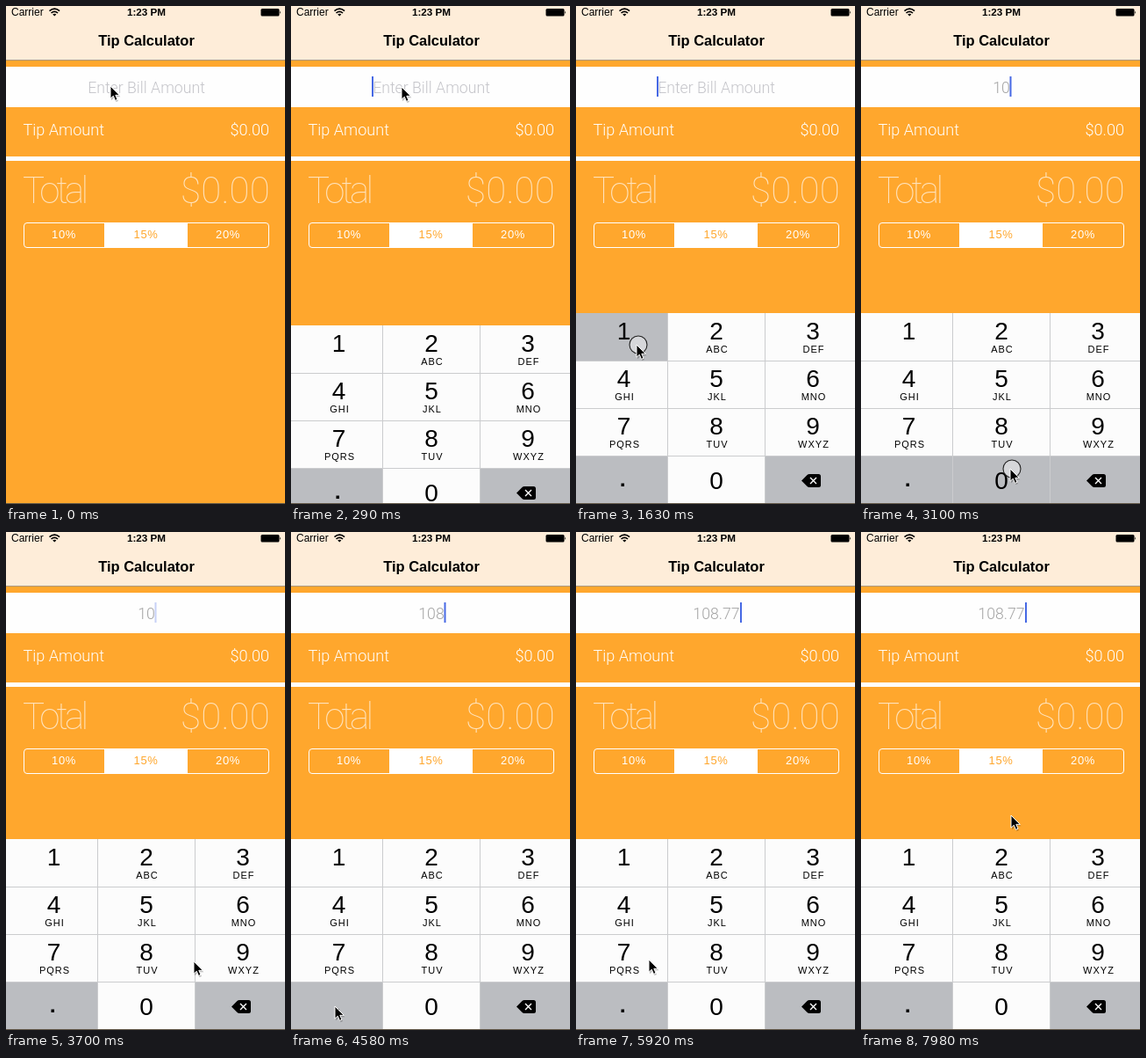
An HTML page that plays this animation: 318 px wide and 566 px high, repeating every 8000 ms.

```html
<!DOCTYPE html>
<html lang="en">
<head>
<meta charset="utf-8">
<title>Tip Calculator</title>
<style>
  html, body { margin: 0; width: 318px; height: 566px; overflow: hidden; background: #ffa72d; }
  svg { display: block; }
  text { font-family: "Liberation Sans", Arial, sans-serif; }
  .light { font: 300 17.7px Roboto, "Open Sans", sans-serif; }
  .label { font-size: 18.1px; }
  .thin { font: 100 42px Roboto, Lato, sans-serif; opacity: .68; }
  .bold { font-weight: 700; }
  .mid { text-anchor: middle; }
  .end { text-anchor: end; }
  .digit { font-size: 28px; text-anchor: middle; }
  .letters { font-size: 11px; letter-spacing: 1px; text-anchor: middle; }
  .segment { font-size: 13px; letter-spacing: .6px; text-anchor: middle; }
</style>
</head>
<body>
<svg width="318" height="566" viewBox="0 0 318 566">
  <rect width="318" height="566" fill="#ffa72d"/>
  <rect width="318" height="61" fill="#feedd9"/>
  <rect y="61" width="318" height="1" fill="#aa9880"/>
  <rect y="69" width="318" height="46" fill="#fefefe"/>
  <rect y="171" width="318" height="5" fill="#fefefe"/>

  <text x="6" y="11" font-size="12">Carrier</text>
  <g fill="none" stroke="#000" stroke-width="1.6">
    <path d="M49.5 5.6Q55.3 .8 61.1 5.6M51.5 8Q55.3 4.7 59.1 8"/>
    <path d="M53.2 9.5Q55.3 7.8 57.4 9.5L55.3 11.6Z" fill="#000" stroke="none"/>
  </g>
  <text class="bold mid" x="160" y="11" font-size="11.7">1:23 PM</text>
  <rect x="290.5" y="3" width="21" height="8.5" rx="1.5"/>
  <path d="M312.3 5.5q1.8 1.7 0 3.4z"/>
  <text class="bold mid" x="160" y="45" font-size="16.5">Tip Calculator</text>

  <text id="amount" class="light mid" x="160" y="99"></text>
  <rect id="caret" y="80" width="2" height="23" fill="#4668e4"/>

  <g fill="#fff">
    <text class="light label" x="19.5" y="147">Tip Amount</text>
    <text class="light label end" x="300" y="147">$0.00</text>
    <text class="thin" x="19" y="224" letter-spacing="-3.8">Total</text>
    <text class="thin end" x="301" y="224" letter-spacing=".2">$0.00</text>
    <rect x="20.5" y="246.5" width="279" height="28" rx="3.5" fill="none" stroke="#fff"/>
    <rect x="112" y="246" width="95" height="29"/>
    <text class="segment" x="66" y="264">10%</text>
    <text class="segment" x="159.5" y="264" fill="#ffa72d">15%</text>
    <text class="segment" x="253" y="264">20%</text>
  </g>

  <g id="keyboard"></g>
  <rect y="565" width="318" height="1" fill="#5f5546"/>
  <g id="pointer">
    <circle id="ring" cx="2" r="10" fill="#fff" fill-opacity=".4" stroke="#222" stroke-width="1.1"/>
    <path d="M1 2V16.2L4.3 13.2 6.5 18 9 17 6.8 12.3H11.4Z" opacity=".25"/>
    <path d="M0 0V14.2L3.3 11.2 5.5 16.4 8 15.3 5.8 10.3H10.4Z" stroke="#fff" stroke-linejoin="round"/>
  </g>
</svg>
<script>
const LOOP = 8000, STEP = 148, KEYBOARD_HEIGHT = 217;
const GREY = '#bbbdc1', WHITE = '#fcfcfc', LINE = '#cbccce';
const $ = id => document.getElementById(id);
const keyboard = $('keyboard');

function add(tag, attrs, content = '') {
  const node = document.createElementNS('http://www.w3.org/2000/svg', tag);
  for (const name in attrs) node.setAttribute(name, attrs[name]);
  node.textContent = content;
  return keyboard.appendChild(node);
}

const labels = ['1', '2 ABC', '3 DEF', '4 GHI', '5 JKL', '6 MNO',
  '7 PQRS', '8 TUV', '9 WXYZ', '.', '0', 'del'];
const columns = [
  { x: 0, width: 104, center: 54.5 },
  { x: 105, width: 110, center: 160 },
  { x: 216, width: 102, center: 270 }
];
const keys = {};

add('rect', { y: 349, width: 318, height: KEYBOARD_HEIGHT, fill: LINE });
labels.forEach((label, i) => {
  const { x, width, center } = columns[i % 3];
  const y = 349 + 54 * Math.floor(i / 3);
  const [name, letters] = label.split(' ');
  const rest = name === '.' || name === 'del' ? GREY : WHITE;
  const cell = add('rect', { x, y, width, height: 54, fill: rest });
  keys[name] = { cell, rest };
  if (name === '.') {
    add('rect', { x: 51.5, y: 542.5, width: 3.5, height: 3.5 });
  } else if (name === 'del') {
    add('path', { d: 'M257 539.5L263.5 533Q264.5 532 266 532H276.5Q279 532 279 534.5V544.5Q279 547 276.5 547H266Q264.5 547 263.5 546Z' });
    add('path', { d: 'M267 536l7 7m0-7l-7 7', stroke: '#fff', 'stroke-width': 1.4 });
  } else {
    add('text', { class: 'digit', x: center, y: letters || name === '1' ? y + 30 : 549 }, name);
    if (letters) add('text', { class: 'letters', x: center + 1, y: y + 45 }, letters);
  }
});
for (const y of [403, 457, 511]) add('rect', { y, width: 318, height: 1, fill: LINE });

const path = [
  [0, 119, 91], [2, 126, 92], [4, 122, 125], [6, 98, 265], [8, 72, 370],
  [10, 69, 385], [12, 69, 385], [14, 112, 460], [16, 150, 520], [18, 170, 526],
  [22, 170, 526], [24, 196, 497], [25, 214, 488], [26, 205, 486], [28, 205, 486],
  [30, 100, 522], [31, 50, 539], [33, 50, 539], [35, 80, 486], [39, 80, 486],
  [40, 83, 486], [41, 150, 522], [42, 250, 550], [43, 289, 525], [44, 235, 415],
  [45, 171, 322]
];
const presses = [['1', 10, 12], ['0', 20, 22], ['8', 27, 29], ['.', 32, 34], ['7', 35, 38]];
const typed = [[12, '1'], [21, '10'], [28, '108'], [33, '108.'], [35, '108.7'], [37, '108.77']];
const blink = [.3, 0, 0, .5, 1, 1, 1];

function pointerAt(step) {
  const next = path.findIndex(p => p[0] > step);
  if (next < 0) return path[path.length - 1].slice(1);
  const [t0, x0, y0] = path[next - 1], [t1, x1, y1] = path[next];
  const k = (step - t0) / (t1 - t0);
  return [x0 + (x1 - x0) * k, y0 + (y1 - y0) * k];
}

// Critically damped slide
function keyboardOffset(step) {
  const w = 18.26 * Math.max(0, step * STEP / 1000 - .052);
  return Math.round(KEYBOARD_HEIGHT * (1 + w) * Math.exp(-w));
}

function caretOpacity(step, since) {
  if (step < 1) return 0;
  const idle = step - since - 4;
  return idle < 0 ? 1 : blink[idle % blink.length];
}

function render(time) {
  const step = Math.floor((time + 12) / STEP);
  const [since, value] = typed.filter(entry => entry[0] <= step).pop() || [1, ''];
  const press = presses.find(([, from, to]) => step >= from && step < to);
  // Blinking restarts when the last key is let go.
  const release = presses.filter(([, , to]) => to <= step).map(p => p[2] - 2).pop() || 0;

  $('amount').textContent = value || 'Enter Bill Amount';
  $('amount').setAttribute('fill', value ? '#a5a5a5' : '#c5c5ca');
  const width = [...value].reduce((sum, c) => sum + (c === '.' ? 5 : 10), 0);
  $('caret').setAttribute('x', value ? 159.5 + width / 2 : 92);
  $('caret').setAttribute('opacity', caretOpacity(step, Math.max(since, release)));

  keyboard.setAttribute('transform', `translate(0 ${keyboardOffset(step)})`);
  for (const name in keys) {
    const { cell, rest } = keys[name];
    const pressed = press && press[0] === name;
    cell.setAttribute('fill', pressed ? (rest === GREY ? WHITE : GREY) : rest);
  }
  $('pointer').setAttribute('transform', `translate(${pointerAt(step)})`);
  $('ring').setAttribute('visibility', press ? 'visible' : 'hidden');
}

const start = performance.now();
function tick() {
  render((performance.now() - start) % LOOP);
  requestAnimationFrame(tick);
}
tick();
</script>
</body>
</html>
```
